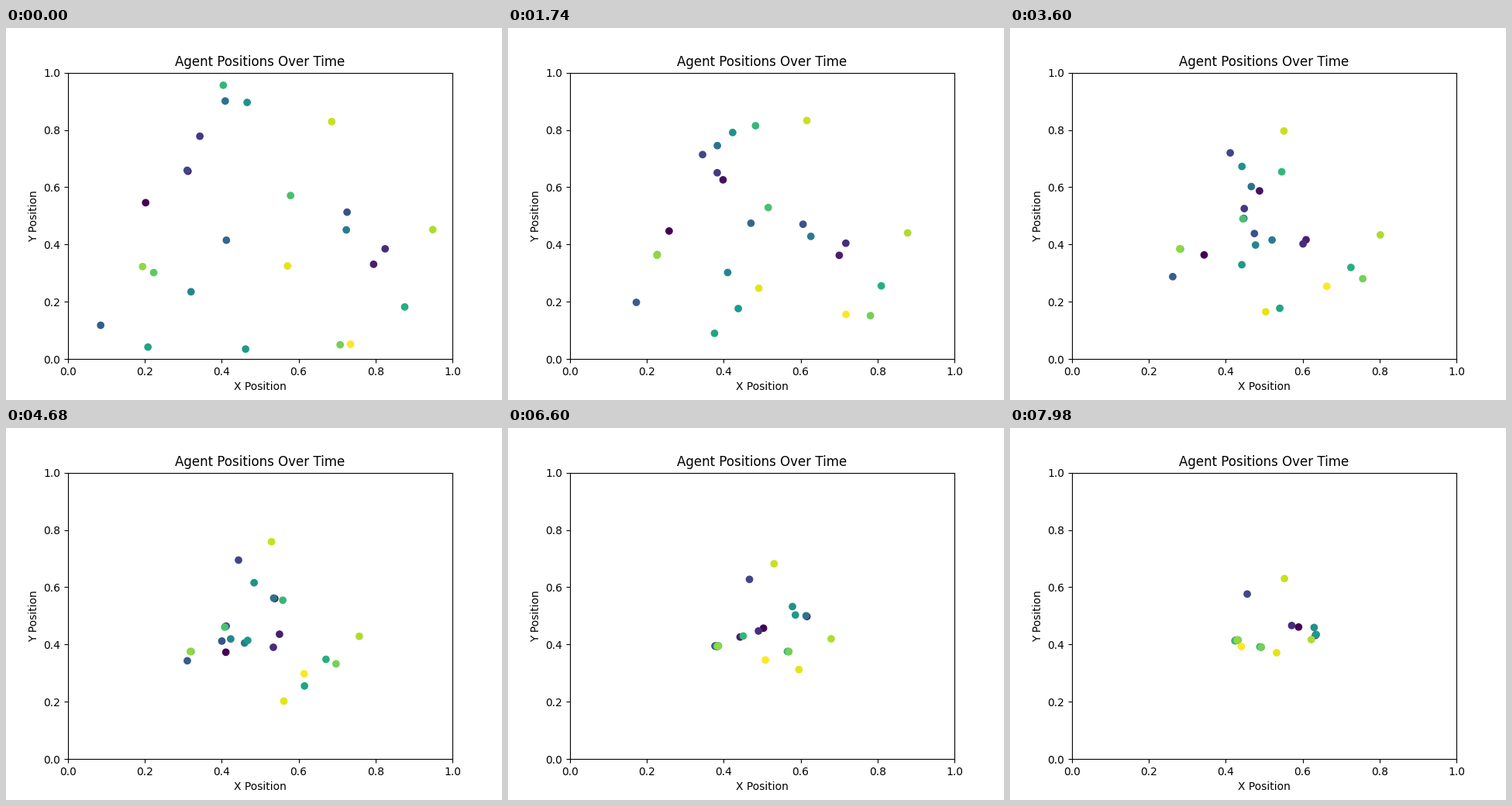
A matplotlib script for the animation above (8 s loop, 640 by 480 pixels).

```python
import numpy as np
import matplotlib.pyplot as plt
from matplotlib.animation import FuncAnimation

INTERVAL = 20          # ms per drawn frame
FRAMES = 400
HOLD = 3               # drawn frames per simulation step

# Initial state, the rest follows from the pursuit rule:
# start x, start y, pace in thousandths per step, index of the agent chased
AGENTS = [
    (.202, .546, 3.92, 13), (.312, .656, 3.15, 21), (.795, .331, 3.44, 8),
    (.825, .385, 3.77, 0), (.343, .778, 4.62, 8), (.310, .659, 2.28, 16),
    (.726, .513, 4.38, 18), (.085, .118, 4.09, 8), (.412, .415, 2.88, 17),
    (.409, .901, 5.50, 1), (.724, .451, 3.45, 18), (.320, .235, 3.88, 6),
    (.466, .896, 3.94, 1), (.462, .035, 4.95, 1), (.208, .042, 6.03, 15),
    (.876, .182, 3.42, 17), (.404, .956, 5.58, 2), (.579, .571, 2.62, 18),
    (.223, .302, 2.18, 0), (.708, .050, 4.40, 15), (.194, .323, 3.50, 18),
    (.949, .452, 2.47, 18), (.686, .829, 2.44, 12), (.571, .325, 3.85, 14),
    (.735, .052, 3.65, 10),
]


def simulate(steps):
    """Every agent heads for its quarry at its own constant pace."""
    x, y, pace, quarry = np.array(AGENTS).T
    quarry = quarry.astype(int)
    pos = np.column_stack([x, y])
    path = [pos]
    for _ in range(steps):
        gap = pos[quarry] - pos
        dist = np.linalg.norm(gap, axis=1)
        stride = np.minimum(pace / 1000, dist) / np.maximum(dist, 1e-9)
        pos = pos + gap * stride[:, None]
        path.append(pos)
    return path


path = simulate((FRAMES - 1) // HOLD)

fig, ax = plt.subplots(figsize=(6.4, 4.8), dpi=100)
dots = ax.scatter(*path[0].T, c=range(len(AGENTS)), cmap="viridis")
ax.set(xlim=(0, 1), ylim=(0, 1), xlabel="X Position", ylabel="Y Position",
       title="Agent Positions Over Time")


def update(frame):
    dots.set_offsets(path[frame // HOLD])
    return (dots,)


anim = FuncAnimation(fig, update, frames=FRAMES, interval=INTERVAL,
                     repeat=True, repeat_delay=0)
plt.show()
```
